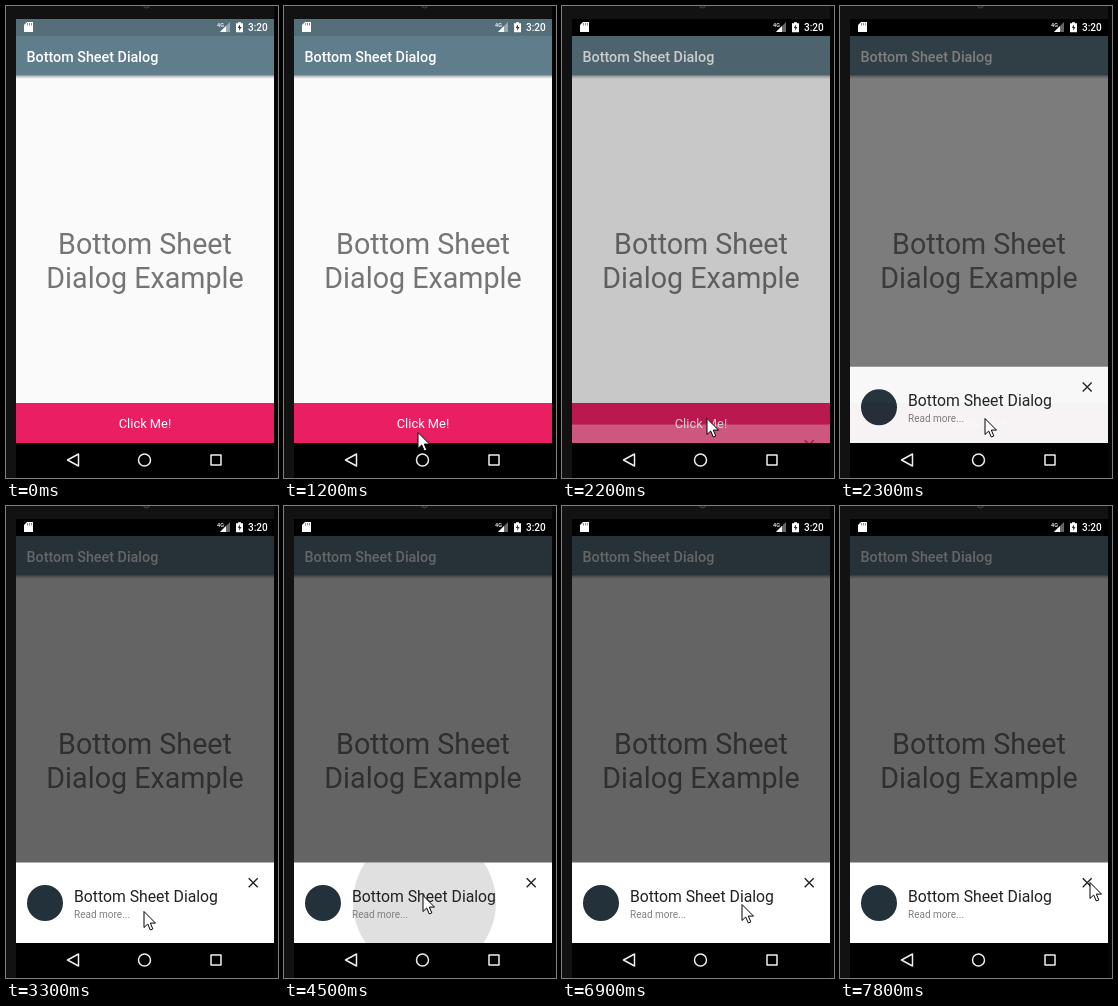
An HTML page that plays this animation: 272 px wide and 472 px high, repeating every 8000 ms.

```html
<!DOCTYPE html>
<html lang="en">
<head>
<meta charset="utf-8">
<title>Bottom sheet demo</title>
<style>
  html, body { margin: 0; width: 100%; height: 100%; overflow: hidden; background: #000; }
  svg { display: block; width: 272px; height: 472px; font-family: Roboto, sans-serif; }
  .medium { font-weight: 500; }
  .headline { font-size: 28.67px; fill: #757575; text-anchor: middle; }
  .line { fill: none; stroke: #eee; stroke-width: 1.5; stroke-linejoin: round; }
</style>
</head>
<body>
<svg viewBox="0 0 272 472">
  <defs>
    <clipPath id="screen"><rect x="10" y="13" width="258" height="424"/></clipPath>
    <clipPath id="sheetArea"><rect x="10" y="356.5" width="258" height="80.5"/></clipPath>
    <linearGradient id="shadow" x2="0" y2="1">
      <stop stop-color="#000" stop-opacity=".3"/>
      <stop offset="1" stop-color="#000" stop-opacity="0"/>
    </linearGradient>
  </defs>

  <!-- device -->
  <rect width="272" height="472" fill="#121212"/>
  <rect x="268" width="4" height="472" fill="#050505"/>
  <circle cx="140.5" cy="-1" r="3" fill="#1c1c1c" stroke="#444"/>
  <rect x="10" y="437" width="258" height="35" fill="#000"/>

  <g clip-path="url(#screen)">
    <!-- app -->
    <rect x="10" y="13" width="258" height="424" fill="#fafafa"/>
    <rect x="10" y="30" width="258" height="39.5" fill="#607d8b"/>
    <rect x="10" y="69.5" width="258" height="3.5" fill="url(#shadow)"/>
    <text class="medium" x="20.5" y="55.5" font-size="14.33" fill="#fff">Bottom Sheet Dialog</text>
    <text class="headline" x="139" y="248">Bottom Sheet</text>
    <text class="headline" x="139" y="281.7">Dialog Example</text>
    <rect x="10" y="397" width="258" height="40" fill="#e91e63"/>
    <rect id="press" x="10" y="397" width="258" height="40" fill="#fff" opacity="0"/>
    <text x="139" y="422" font-size="12.9" fill="#fff" text-anchor="middle">Click Me!</text>
    <rect id="scrim" x="10" y="30" width="258" height="407" opacity="0"/>

    <!-- status bar -->
    <rect id="status" x="10" y="13" width="258" height="17"/>
    <path d="M21 16h6v10h-9v-7z" fill="#fff"/>
    <path d="M21.5 17v2.5M23.5 17v2.5M25.5 17v2.5" stroke="#777" stroke-width=".8"/>
    <path d="M224 16v10h-10z" fill="#fff" opacity=".4"/>
    <path d="M220 20v6h-6z" fill="#fff"/>
    <text class="medium" x="211" y="20.5" font-size="5.5" fill="#fff">4G</text>
    <path d="M232 16.2h3v1h2v9h-7v-9h2z" fill="#fff"/>
    <path d="M234 18.5l-2.3 3.6h1.5v2.7l2.3-3.7h-1.5z" fill="#333"/>
    <text class="medium" x="242" y="25.2" font-size="10.03" fill="#fff">3:20</text>

    <!-- bottom sheet -->
    <g id="sheet" opacity="0">
      <rect x="10" y="356.5" width="258" height="81" fill="#fff"/>
      <g clip-path="url(#sheetArea)">
        <circle id="cardRipple"/>
        <circle id="iconRipple"/>
      </g>
      <circle cx="39" cy="397" r="18" fill="#22313a"/>
      <text x="68" y="396.2" font-size="15.77" fill="#212121">Bottom Sheet Dialog</text>
      <text x="68" y="411.5" font-size="10.03" fill="#808080">Read more...</text>
      <path d="M242.7 372.2l9 9m0-9l-9 9" stroke="#222" stroke-width="1.4"/>
    </g>
  </g>

  <!-- navigation -->
  <path class="line" d="M72.5 448v12l-11-6z"/>
  <circle class="line" cx="138.5" cy="454" r="6"/>
  <rect class="line" x="205" y="449" width="10" height="10"/>

  <path id="cursor" d="M0 .5v16l3.7-3.5 2.6 6 2.5-1.1-2.5-5.8h5.2z" fill="#fff" stroke="#000" stroke-width="1" stroke-linejoin="round"/>
</svg>

<script>
const LOOP = 8000, STEP = 100;
const el = id => document.getElementById(id);
const set = (id, attrs) => {
  for (const name in attrs) el(id).setAttribute(name, attrs[name]);
};

// Each key is [time, ...values]; values are interpolated linearly.
const track = (keys, t) => {
  const next = keys.findIndex(key => key[0] > t);
  if (next === 0) return keys[0].slice(1);
  if (next < 0) return keys[keys.length - 1].slice(1);
  const a = keys[next - 1], b = keys[next];
  const p = (t - a[0]) / (b[0] - a[0]);
  return a.slice(1).map((v, i) => v + (b[i + 1] - v) * p);
};

const pointer = [
  [1000, 151, 460], [1200, 134, 426], [1400, 145, 412],
  [3200, 145, 412], [3300, 138, 405], [3400, 139, 394], [3500, 139, 389],
  [5000, 139, 389], [5100, 128, 390], [5400, 45, 395], [5500, 36, 393],
  [6500, 36, 393], [6700, 84, 402], [6900, 180, 398], [7100, 260, 380],
  [7300, 260, 380], [7800, 250, 376]
];
const scrim = [[2100, 0], [2200, .2], [2300, .5], [2400, .6]];
const slide = [[2100, 0], [2200, .27], [2300, .95], [2400, 1]];
// x, y, radius, opacity
const cardRipple = [
  [3900, 139, 389, 0, 0], [4000, 139, 390, 16, .08], [4200, 140, 393, 46, .12],
  [4500, 140.5, 396.5, 71.5, .12], [4900, 140.5, 396.5, 71.5, .12],
  [5300, 140.5, 396.5, 71.5, 0]
];
const iconRipple = [
  [5700, 37, 394, 8, 0], [5800, 38, 395, 20, .03], [6000, 38.5, 396.5, 33.5, .03],
  [6100, 38.5, 396.5, 33.5, .03], [6400, 38.5, 396.5, 33.5, 0]
];

function drawRipple(id, keys, t) {
  const [cx, cy, r, opacity] = track(keys, t);
  set(id, { cx, cy, r, opacity });
}

function draw(now) {
  const t = Math.floor((now % LOOP) / STEP) * STEP;
  const [x, y] = track(pointer, t);
  const [shown] = track(slide, t);
  set('cursor', { transform: `translate(${x} ${y})`, opacity: t >= 1000 ? 1 : 0 });
  set('status', { fill: t >= 2100 ? '#000' : '#546e7a' });
  set('press', { opacity: t === 2000 ? .08 : 0 });
  set('scrim', { opacity: track(scrim, t)[0] });
  set('sheet', { opacity: shown, transform: `translate(0 ${85 * (1 - shown)})` });
  drawRipple('cardRipple', cardRipple, t);
  drawRipple('iconRipple', iconRipple, t);
}

const start = performance.now();
function tick() {
  draw(performance.now() - start);
  requestAnimationFrame(tick);
}
tick();
</script>
</body>
</html>
```
